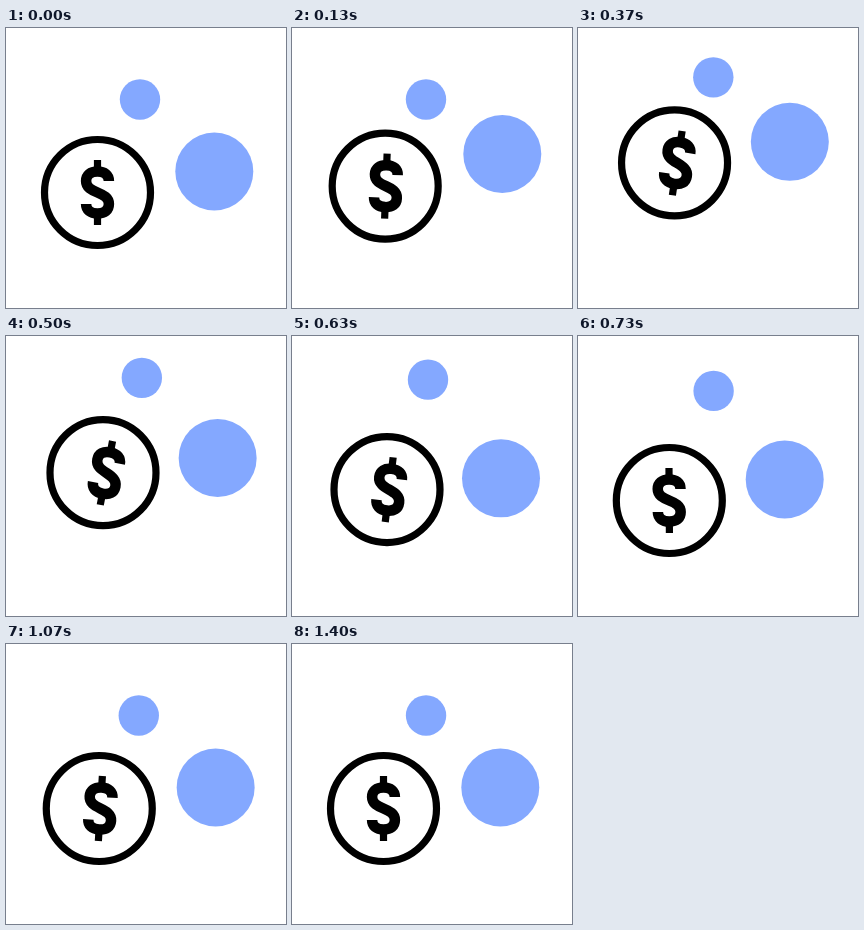
An HTML page for the animation above (1.53 s loop, 280x280 px).

```html
<!DOCTYPE html>
<html lang="en">
<head>
<meta charset="utf-8">
<title>Bouncing coin</title>
<style>
  html, body { margin: 0; height: 100%; overflow: hidden; background: #fff; }
  svg { display: block; width: 100vw; height: 100vh; }
</style>
</head>
<body>
<svg viewBox="0 0 280 280">
  <g fill="#84a8ff">
    <circle id="small" r="20.2"/>
    <circle id="big" r="39"/>
  </g>
  <g fill="none" stroke="#000" stroke-width="7.2">
    <circle id="ring" r="53"/>
    <g id="sign">
      <path d="M0-32.5V-22M0 22V32.5"/>
      <path stroke-width="10.5" d="M11.4-11.5C11.4-17.5 7-21 0-21S-11.4-17.5-11.4-11.5C-11.4-5-6-2.5 0 0S11.4 5 11.4 11.5 7 21 0 21-11.4 17.5-11.4 11.5"/>
    </g>
  </g>
</svg>
<script>
const LOOP = 1530, FPS = 0.03, JUMP = 29.7;
const RISE = 333, FALL = 325, PIVOT = 18;

const clamp = p => Math.min(1, Math.max(0, p));
const inOut = p => (1 - Math.cos(Math.PI * p)) / 2;

// Quick start, long soft arrival.
function lift(p) {
  const q = 1 - (1 - clamp(p)) ** 1.6;
  return q * q * (3 - 2 * q);
}

const height = t => JUMP * (t < RISE ? lift(t / RISE) : lift((RISE + FALL - t) / FALL));

// Damped sway: out to 1, then swinging back to rest.
const swings = [[450, 1], [830, -0.7], [1035, 0.4], [1233, 0]];

function sway(t, power) {
  if (t < swings[0][0]) return 1 - (1 - clamp(t / swings[0][0])) ** power;
  for (let i = 1; i < swings.length; i++) {
    const [t0, from] = swings[i - 1], [t1, to] = swings[i];
    if (t < t1) return from + (to - from) * inOut((t - t0) / (t1 - t0));
  }
  return 0;
}

const coin = { x: 91.5, y: 164.5, delay: 67, shift: 5.5 };
const parts = [
  { id: "big", x: 208.3, y: 143.5, delay: 0, shift: 3.6, tilt: 0 },
  { id: "ring", ...coin, tilt: 0 },
  { id: "sign", ...coin, tilt: 11 },
  { id: "small", x: 134, y: 71.5, delay: 200, shift: 2, tilt: 0 }
].map(part => ({ ...part, node: document.getElementById(part.id) }));

function draw(now) {
  const time = Math.floor((now % LOOP + 4) * FPS) / FPS;
  for (const { node, x, y, delay, shift, tilt } of parts) {
    const t = time - delay;
    const px = x + shift * sway(t, 2.3), py = y - height(t);
    node.setAttribute("transform", `translate(${px} ${py}) rotate(${tilt * sway(t, 1.4)} 0 ${PIVOT})`);
  }
}

let start;
function tick(now) {
  start ??= now;
  draw(now - start);
  requestAnimationFrame(tick);
}
draw(0);
requestAnimationFrame(tick);
</script>
</body>
</html>
```
